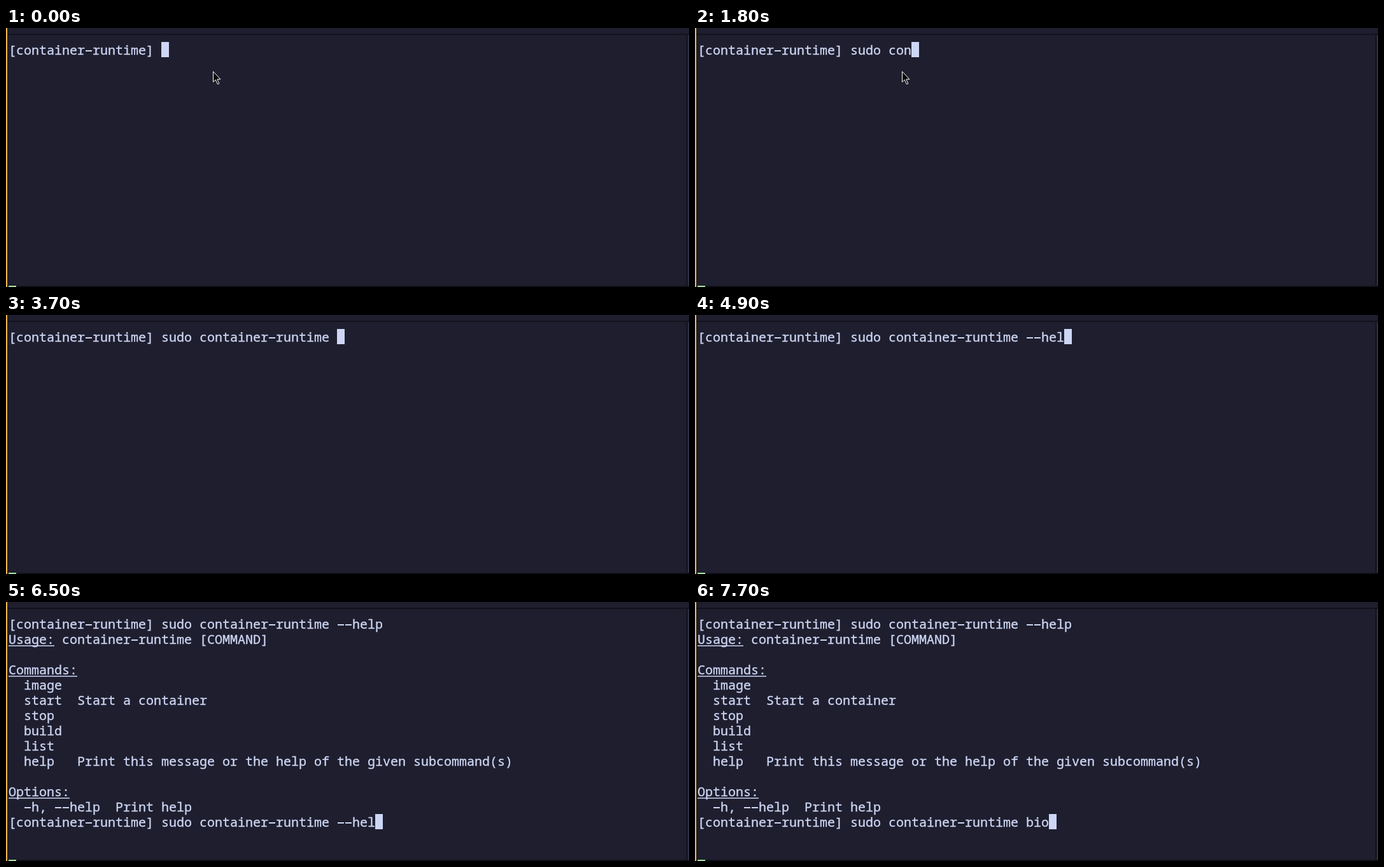
An HTML page that plays this animation: 1073x408 px, repeating every 8000 ms.

```html
<!DOCTYPE html>
<html lang="en">
<head>
<meta charset="utf-8">
<title>Terminal</title>
<style>
  html, body { margin: 0; width: 100%; height: 100%; overflow: hidden; background: #1e1e2e; }
  svg { display: block; }
  text {
    font: 500 20px "Noto Sans Mono", "DejaVu Sans Mono", monospace;
    white-space: pre; fill: #cdd6f4; stroke: #cdd6f4; stroke-width: .35;
  }
  .dash { fill: none; stroke: none; }
  .bars { stroke: #cdd6f4; stroke-width: 2; }
  .rule { stroke: #cdd6f4; stroke-width: 1.5; }
</style>
</head>
<body>
<svg width="1073" height="408" viewBox="0 0 1073 408">
  <rect width="1073" height="408" fill="#1e1e2e"/>
  <path d="M1071 10h2v398h-2z" fill="#313244"/>
  <path d="M2 9h1071v2H2zM1069 10h2v398h-2zM2 406h1071v2H2z" fill="#12121c"/>
  <rect width="2" height="408" fill="#f9b750"/>
  <rect x="4" y="406" width="12" height="2" fill="#a6e3a1"/>
  <g id="first"></g>
  <g id="output"></g>
  <g id="second"></g>
  <rect id="cursor" width="12" height="24" fill="#cdd6f4"/>
  <path id="mouse" d="M325.5 68.5v16.5l3.8-3.4 3.2 7 2.4-1.1-3-6.7h5.1z" fill="#08080c" stroke="#fff"/>
</svg>
<script>
const LOOP = 8000, TICK = 100;
const CELL = 12, ROW = 24, LEFT = 4, TOP = 22;
const MOUSE_OUT = 2900, ENTER = 5300, PRINT = 5400, RECALL = 6000;
const PROMPT = '[container-runtime] ';
const COMMAND = 'sudo container-runtime ', FLAG = '--help';
const OUTPUT = [
  'Usage: container-runtime [COMMAND]',
  '',
  'Commands:',
  '  image',
  '  start  Start a container',
  '  stop',
  '  build',
  '  list',
  '  help   Print this message or the help of the given subcommand(s)',
  '',
  'Options:',
  '  -h, --help  Print help'
];

const $ = id => document.getElementById(id);
const first = $('first'), output = $('output'), second = $('second');
const cursor = $('cursor'), mouse = $('mouse');

// Types a word at an even pace; with to < from it is erased instead.
function type(t, word, from, to) {
  const u = Math.min(1, Math.max(0, (t - from) / (to - from)));
  return word.slice(0, Math.round(word.length * u));
}

function firstInput(t) {
  return type(t, 'sudo ', 800, 1300) + type(t, 'container-', 1500, 2600)
    + type(t, 'runtime ', 2750, 3700) + type(t, FLAG, 4200, 5000);
}

function secondInput(t) {
  if (t < RECALL) return '';
  return COMMAND + type(t, FLAG, 7200, 6400) + type(t, 'bio', 7300, 7700);
}

// One terminal row; hyphens get wide bars, headings get a rule.
function line(row, str) {
  const y = TOP + row * ROW;
  const body = str.replace(/-/g, '<tspan class="dash">-</tspan>');
  let bars = '';
  [...str].forEach((c, i) => {
    if (c === '-') bars += `M${LEFT + i * CELL + 1} ${y + 14}h10`;
  });
  const head = /^[A-Z]\w+:/.exec(str);
  const rule = head
    ? `<path class="rule" d="M${LEFT} ${y + 23}h${head[0].length * CELL}"/>` : '';
  return `<text x="${LEFT}" y="${y + 20}">${body}</text><path class="bars" d="${bars}"/>${rule}`;
}

function show(el, on) {
  el.setAttribute('visibility', on ? 'visible' : 'hidden');
}

function placeCursor(row, col) {
  cursor.setAttribute('x', LEFT + col * CELL);
  cursor.setAttribute('y', TOP + row * ROW);
}

function render(t) {
  const top = PROMPT + firstInput(t);
  const bottom = PROMPT + secondInput(t);
  const last = OUTPUT.length + 1;
  first.innerHTML = line(0, top);
  second.innerHTML = line(last, bottom);
  show(output, t >= PRINT);
  show(second, t >= PRINT);
  show(mouse, t < MOUSE_OUT);
  if (t < ENTER) placeCursor(0, top.length);
  else if (t < PRINT) placeCursor(1, 0);
  else placeCursor(last, bottom.length);
}

let shown = -1;
function draw() {
  const tick = Math.floor(performance.now() % LOOP / TICK);
  if (tick !== shown) render((shown = tick) * TICK);
  requestAnimationFrame(draw);
}

output.innerHTML = OUTPUT.map((s, i) => line(i + 1, s)).join('');
draw();
</script>
</body>
</html>
```
